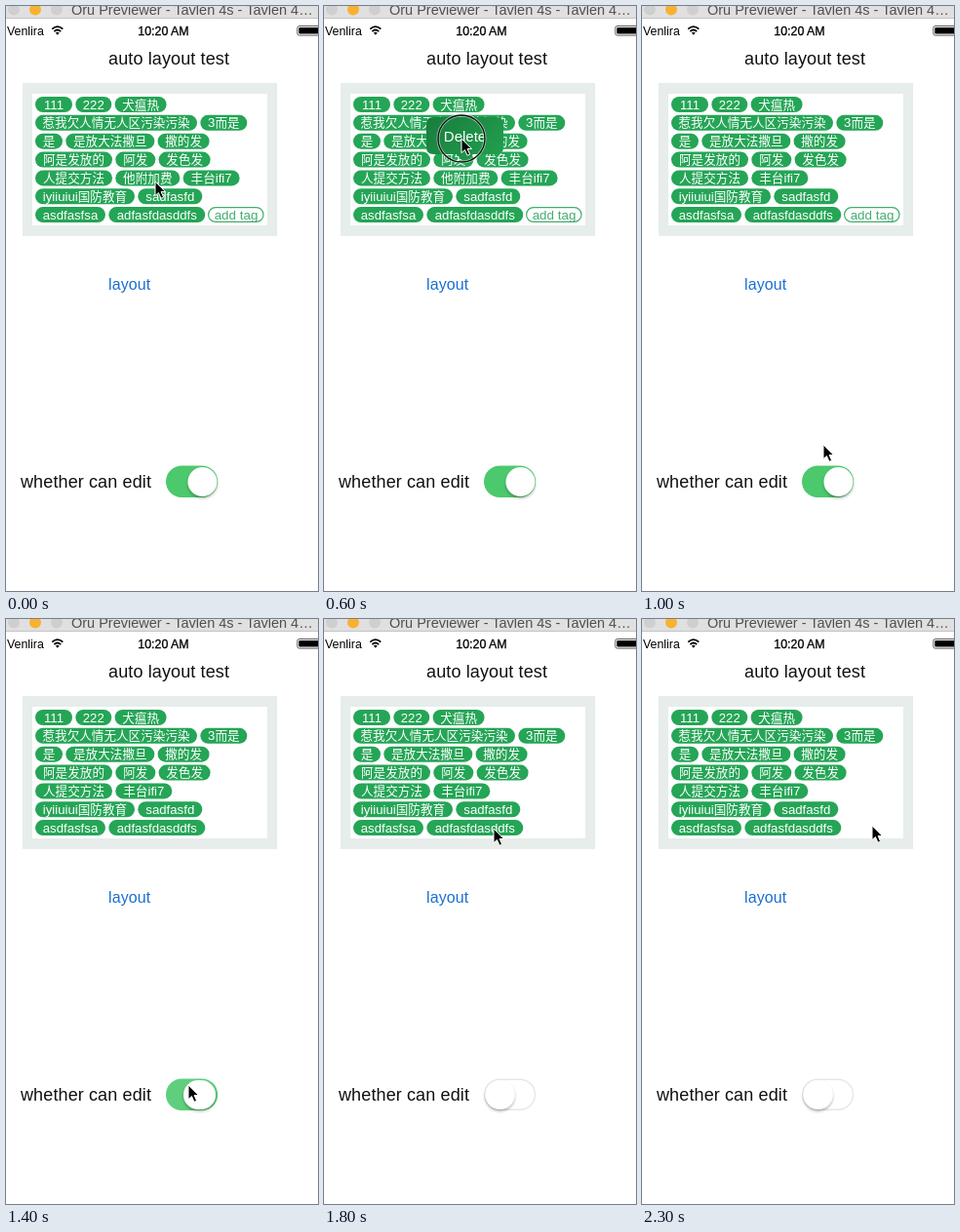
Write an HTML page that moves like this. It is 320 by 600 pixels and loops after 2400 ms.

```html
<!DOCTYPE html>
<html lang="en">
<head>
<meta charset="utf-8">
<title>Tag view</title>
<style>
  html, body { margin: 0; width: 100%; height: 100%; overflow: hidden; background: #fff; }
  svg { display: block; font-family: "Liberation Sans", "Noto Sans CJK SC", "Noto Sans CJK JP", "Noto Sans CJK", sans-serif; }
  .status { font-size: 12.4px; }
  .label { font-size: 18px; letter-spacing: .12px; fill: #111; }
  .tag { font-size: 12.6px; fill: #fff; text-anchor: middle; }
  .latin { font-size: 13.2px; }
</style>
</head>
<body>
<svg id="stage" width="320" height="600" viewBox="0 0 320 600">
  <defs>
    <linearGradient id="dark" x2="0" y2="1">
      <stop offset="0" stop-color="#153b22"/><stop offset="1" stop-color="#0b2816"/>
    </linearGradient>
    <linearGradient id="lit" x2="1" y2=".6">
      <stop offset="0" stop-color="#187d3d"/><stop offset="1" stop-color="#219c4c"/>
    </linearGradient>
    <filter id="shade" x="-30%" y="-30%" width="160%" height="170%">
      <feDropShadow dx="0" dy="2" stdDeviation="1.5" flood-opacity=".3"/>
    </filter>
  </defs>

  <!-- title bar -->
  <rect width="320" height="12" fill="#e0e0e0"/>
  <rect y="12" width="320" height="1" fill="#c4c4c4"/>
  <circle cx="8" cy="3.5" r="6" fill="#cfcfcf"/>
  <circle cx="30" cy="3.5" r="6" fill="#f8b130"/>
  <circle cx="52" cy="3.5" r="6" fill="#cfcfcf"/>
  <text x="67" y="9" font-size="14.5" fill="#505050">Oru Previewer - Tavlen 4s - Tavlen 4…</text>

  <!-- status bar -->
  <text class="status" x="1" y="30">Venlira</text>
  <g fill="none" stroke="#000" stroke-width="1.8">
    <path d="M47.3 23.7Q52.8 18.6 58.3 23.7M49.4 26.1Q52.8 22.9 56.2 26.1"/>
    <path d="M50.9 27.5Q52.8 26 54.7 27.5L52.8 29.8Z" fill="#000" stroke="none"/>
  </g>
  <text class="status" x="161.5" y="30" text-anchor="middle" stroke="#000" stroke-width=".3">10:20 AM</text>
  <rect x="298.8" y="20.5" width="26" height="9.6" rx="2" fill="none" stroke="#333" stroke-width=".8"/>
  <rect x="300.3" y="22" width="24" height="6.6" rx="1"/>

  <text class="label" x="105" y="60">auto layout test</text>
  <rect x="17" y="79" width="261" height="157" fill="#e6edeb"/>
  <rect x="27" y="90" width="241" height="135" fill="#fff"/>
  <g id="tags"></g>
  <g id="add">
    <rect x="207.6" y="206.6" width="56.4" height="14.8" rx="7.4" fill="#fff" stroke="#3fae6d" stroke-width="1.2"/>
    <text x="236" y="218.6" font-size="13.4" fill="#45ab70" text-anchor="middle">add tag</text>
  </g>
  <text x="105" y="291" font-size="16" letter-spacing=".1" fill="#1a6fd2">layout</text>

  <text class="label" x="15" y="494">whether can edit</text>
  <rect id="track" x="164.7" y="472.2" width="51.8" height="31" rx="15.5" stroke-width="1.4"/>
  <rect id="knob" y="473" height="30" rx="15" fill="#fff" filter="url(#shade)"/>

  <g id="menu">
    <path id="bubble" d="M112 114H177Q184 114 184 121V145Q184 152 177 152H153L144.5 161.5L136 152H112Q105 152 105 145V121Q105 114 112 114Z"/>
    <text x="144.5" y="139" font-size="15" fill="#fff" text-anchor="middle">Delete</text>
  </g>

  <g id="pointer">
    <g id="ring" fill="none">
      <circle r="24" stroke="#fff" stroke-opacity=".55" stroke-width="3"/>
      <circle r="24" stroke="#111" stroke-width="1.4"/>
    </g>
    <path d="M0 0V14.6L3.4 11.5L6 17.3L8.6 16.2L6.1 10.5H10.6Z" fill="#000" stroke="#fff" stroke-width="1"/>
  </g>
</svg>
<script>
const STEP = 100, LOOP = 2400;
const GREEN = '#25a556';
const $ = id => document.getElementById(id);

function make(name, attrs, parent) {
  const el = document.createElementNS('http://www.w3.org/2000/svg', name);
  for (const key in attrs) el.setAttribute(key, attrs[key]);
  return parent.appendChild(el);
}

// Each row: label, pill width
const rows = [
  [['111', 38], ['222', 37], ['犬瘟热', 53]],
  [['惹我欠人情无人区污染污染', 166], ['3而是', 48]],
  [['是', 28], ['是放大法撒旦', 91], ['撒的发', 53]],
  [['阿是发放的', 79], ['阿发', 41], ['发色发', 53]],
  [['人提交方法', 79], ['他附加费', 66], ['丰台ifi7', 58]],
  [['iyiiuiui国防教育', 102], ['sadfasfd', 66]],
  [['asdfasfsa', 72], ['adfasfdasddfs', 99]]
];
const GAP = 3.3;

function drawTag(label, x, y, width) {
  const g = make('g', { transform: `translate(${x} ${y})` }, $('tags'));
  make('rect', { y: -8, width, height: 16, rx: 8, fill: GREEN }, g);
  const text = make('text', { class: 'tag', x: width / 2, y: 4.6 }, g);
  for (const run of label.match(/[a-z0-9]+|[^a-z0-9]+/g)) {
    make('tspan', /[a-z0-9]/.test(run) ? { class: 'latin' } : {}, text).textContent = run;
  }
  return { g, x, y };
}

const tags = {};
rows.forEach((row, r) => {
  let x = 30;
  for (const [label, width] of row) {
    tags[label] = drawTag(label, x, 101 + r * 18.85, width);
    x += width + GAP;
  }
});
const removed = tags['他附加费'], follower = tags['丰台ifi7'];

// Pointer tip at every step
const path = [
  [153, 180], [153, 180], [158, 174], [162, 164], [153, 150], [143, 138],
  [141, 136], [143, 148], [157, 240], [176, 370], [186, 450], [187, 474],
  [187, 480], [187, 479], [187, 478], [186, 468], [181, 400], [175, 295],
  [174, 215], [177, 219], [193, 203], [213, 189], [230, 200], [236, 212]
];
const clicks = [1, 6, 12];
const menuAlpha = { 2: 1, 3: 1, 4: 1, 5: 1, 6: 1, 7: .4 };

function drawSwitch(i) {
  const [left, width, fill, edge] =
    i < 13 ? [186.5, 30, '#4bc96c', '#4bc96c'] :
    i < 15 ? [182, 33, '#5fcf7d', '#5fcf7d'] :
    i < 16 ? [172, 33, '#d3f0db', '#d3ead9'] :
             [165.5, 30, '#fff', '#e7e7e7'];
  $('knob').setAttribute('x', left);
  $('knob').setAttribute('width', width);
  $('track').setAttribute('fill', fill);
  $('track').setAttribute('stroke', edge);
}

function draw(i) {
  const [x, y] = path[i];
  $('pointer').setAttribute('transform', `translate(${x} ${y})`);
  $('ring').setAttribute('opacity', clicks.includes(i) ? 1 : 0);
  $('menu').setAttribute('opacity', menuAlpha[i] || 0);
  $('bubble').setAttribute('fill', i < 6 ? 'url(#dark)' : 'url(#lit)');
  const gone = i >= 7;
  removed.g.setAttribute('opacity', gone ? 0 : 1);
  follower.g.setAttribute('transform', `translate(${gone ? removed.x : follower.x} ${follower.y})`);
  $('add').setAttribute('opacity', i < 13 ? 1 : 0);
  drawSwitch(i);
}

const start = performance.now();
function tick() {
  draw(Math.floor((performance.now() - start) % LOOP / STEP));
  requestAnimationFrame(tick);
}
tick();
</script>
</body>
</html>
```
